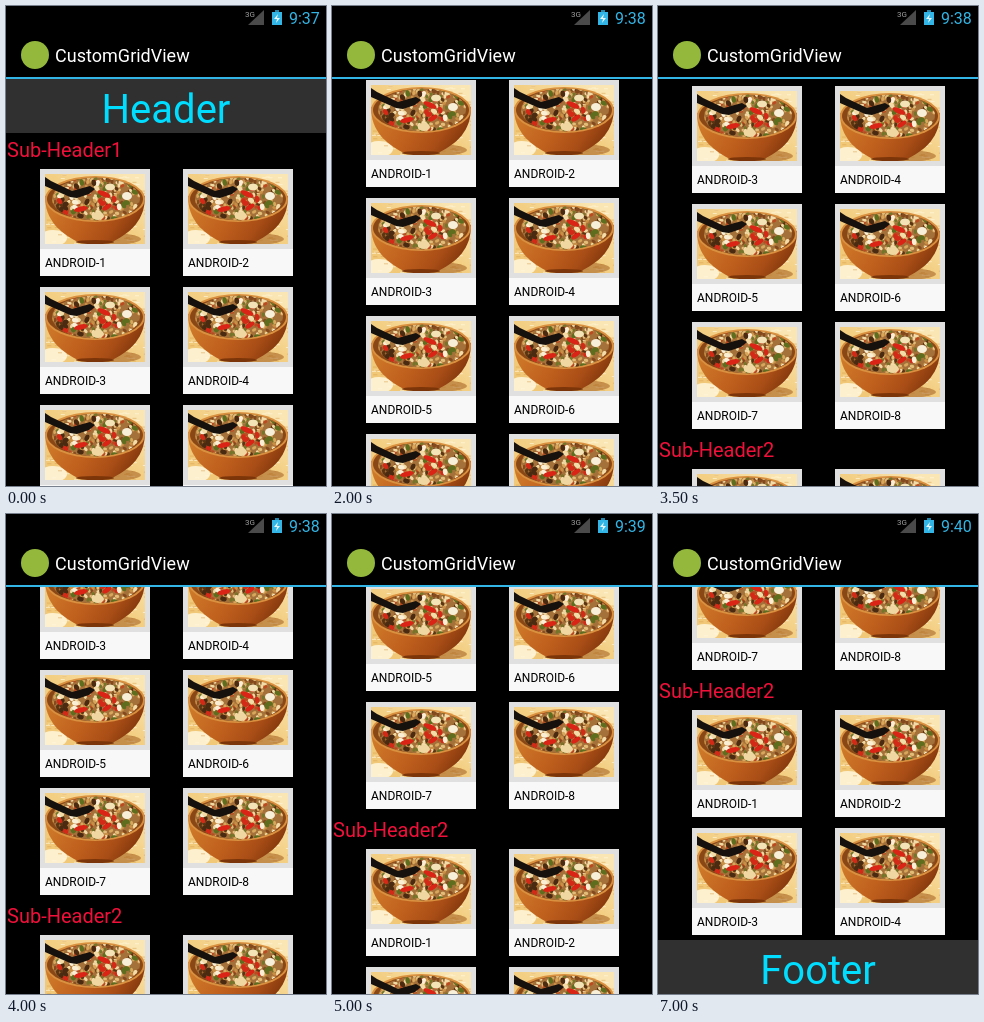
These frames come from a looping animation (320 px wide and 480 px high, 7.5 s). An HTML page with a canvas:

```html
<!DOCTYPE html>
<html lang="en">
<head>
<meta charset="utf-8">
<title>CustomGridView</title>
<style>
html, body { margin: 0; width: 100%; height: 100%; overflow: hidden; background: #000; }
canvas { display: block; width: 320px; height: 480px; }
</style>
</head>
<body>
<canvas id="stage" width="320" height="480"></canvas>
<script>
const ctx = document.getElementById('stage').getContext('2d');
const STEP = 500;
const SCROLL = [0, 22, 44, 66, 89, 124, 159, 201, 243, 286, 329, 367, 405, 437, 468];
const CLOCK = [[0, '9:37'], [4, '9:38'], [9, '9:39'], [14, '9:40']];
const BLUE = '#33b5e5';
const COLUMNS = [34, 177];
const ROW = 118;

function rect(c, x, y, w, h, color) {
  c.fillStyle = color;
  c.fillRect(x, y, w, h);
}

function ellipse(c, x, y, rx, ry, color, turn = 0) {
  c.fillStyle = color;
  c.beginPath();
  c.ellipse(x, y, rx, ry, turn, 0, Math.PI * 2);
  c.fill();
}

function poly(c, points, color) {
  c.fillStyle = color;
  c.beginPath();
  points.forEach(([x, y]) => c.lineTo(x, y));
  c.fill();
}

function text(str, x, y, size, color, align = 'left') {
  ctx.font = size + 'px Roboto, "Noto Sans", sans-serif';
  ctx.fontKerning = 'none';
  ctx.textAlign = align;
  ctx.fillStyle = color;
  ctx.fillText(str, x, y);
}

function seeded(seed) {
  return () => (seed = (seed * 16807) % 2147483647) / 2147483647;
}

// Bowl of rice, drawn once and reused by every card
function makeDish() {
  const dish = document.createElement('canvas');
  dish.width = 100;
  dish.height = 70;
  const c = dish.getContext('2d');
  const rnd = seeded(4217);
  const pick = list => list[Math.floor(rnd() * list.length)];

  const cloth = c.createLinearGradient(80, 0, 30, 70);
  cloth.addColorStop(0, '#fae6b4');
  cloth.addColorStop(0.5, '#f3cf84');
  cloth.addColorStop(1, '#f0c878');
  rect(c, 0, 0, 100, 70, cloth);
  ellipse(c, 8, 64, 14, 8, '#fdf0cf');
  for (let i = 0; i < 170; i++) {
    rect(c, rnd() * 100, rnd() * 70, 4, 1, pick(['#fff6dcaa', '#d9a04e88']));
  }
  ellipse(c, 64, 65, 32, 6, '#a8682999');

  const glaze = c.createLinearGradient(10, 20, 85, 70);
  glaze.addColorStop(0, '#cf7a2a');
  glaze.addColorStop(0.45, '#bf5f1d');
  glaze.addColorStop(0.75, '#a84d16');
  glaze.addColorStop(1, '#7d340b');
  c.fillStyle = glaze;
  c.beginPath();
  c.moveTo(0, 22);
  c.bezierCurveTo(0, 47, 16, 59, 31, 67);
  c.quadraticCurveTo(50, 72, 69, 67);
  c.bezierCurveTo(86, 58, 100, 46, 100, 22);
  c.fill();
  ellipse(c, 50, 68, 19, 2, '#7c3508');

  ellipse(c, 50, 25, 50, 23, '#d9903f');
  ellipse(c, 50, 25, 48, 21, '#8a4716');
  c.save();
  c.beginPath();
  c.ellipse(51, 25, 44, 21.5, 0, 0, Math.PI * 2);
  c.clip();
  rect(c, 0, 0, 100, 50, '#a5713a');
  const grains = ['#e3bd78', '#84491d', '#f1d9a4', '#c98f45', '#5b3512', '#d8a75c', '#75752a', '#bb4a20'];
  for (let i = 0; i < 300; i++) {
    ellipse(c, 7 + rnd() * 88, 3 + rnd() * 44, 2.3, 1.5, pick(grains), rnd() * 3);
  }
  const bits = ['#faefd4', '#d32a18', '#f4dca8', '#5e6d1e', '#4a2a10'];
  for (let i = 0; i < 45; i++) {
    ellipse(c, 14 + rnd() * 78, 7 + rnd() * 38, 3.3, 2.3, bits[i % bits.length], rnd() * 3);
  }
  ellipse(c, 59, 20, 7, 2.6, '#da2416', 0.4);
  ellipse(c, 36, 35, 7, 2.6, '#da2416', -0.2);
  ellipse(c, 62, 33, 5, 2.3, '#da2416', -0.6);
  ellipse(c, 53, 42, 6, 4, '#f0d6a0');
  ellipse(c, 82, 22, 5, 4, '#f8efd8');
  ellipse(c, 65, 13, 5, 3.5, '#f5e3b8');
  c.restore();

  poly(c, [[0, 3], [6, 7], [27, 17], [45, 12], [50, 15], [44, 20], [32, 24], [25, 23], [0, 12]], '#17110d');
  return dish;
}

const dish = makeDish();

function card(x, y, n) {
  if (y > 480 || y < -40) return;
  rect(ctx, x, y, 110, 80, '#e0e0e0');
  rect(ctx, x, y + 80, 110, 27, '#f8f8f8');
  ctx.drawImage(dish, x + 5, y + 5);
  text('ANDROID-' + n, x + 5, y + 98, 12, '#000');
}

function section(title, top, count) {
  text(title, 1, top - 12, 20, '#f0103a');
  for (let i = 0; i < count; i++) {
    card(COLUMNS[i % 2], top + Math.floor(i / 2) * ROW, i + 1);
  }
}

function banner(label, top) {
  rect(ctx, 0, top, 320, 54, '#303030');
  text(label, 160, top + 44, 40, '#00ddff', 'center');
}

function list(scroll) {
  ctx.save();
  ctx.beginPath();
  ctx.rect(0, 73, 320, 407);
  ctx.clip();
  banner('Header', 73 - scroll);
  section('Sub-Header1', 163 - scroll, 8);
  section('Sub-Header2', 664 - scroll, 4);
  banner('Footer', 894 - scroll);
  ctx.restore();
}

function bars(clock) {
  poly(ctx, [[258, 4], [258, 19], [242, 19]], '#4a4a4a');
  text('3G', 239, 11, 8, '#a0a0a0');
  rect(ctx, 269, 4, 4, 2, '#2787ab');
  rect(ctx, 266, 6, 10, 13, BLUE);
  poly(ctx, [[272, 8], [268, 13], [271, 13], [270, 17], [274, 12], [271, 12]], '#e8f6fc');
  text(clock, 283, 18, 16, BLUE);

  ellipse(ctx, 29, 49, 14, 14, '#93b83c');
  text('CustomGridView', 49, 56, 18, '#fff');
  rect(ctx, 0, 71, 320, 2, BLUE);
}

function draw(now) {
  const step = Math.floor(now / STEP) % SCROLL.length;
  const clock = CLOCK.filter(([from]) => from <= step).pop()[1];
  rect(ctx, 0, 0, 320, 480, '#000');
  list(SCROLL[step]);
  bars(clock);
}

const start = performance.now();
function tick() {
  draw(performance.now() - start);
  requestAnimationFrame(tick);
}
tick();
</script>
</body>
</html>
```
